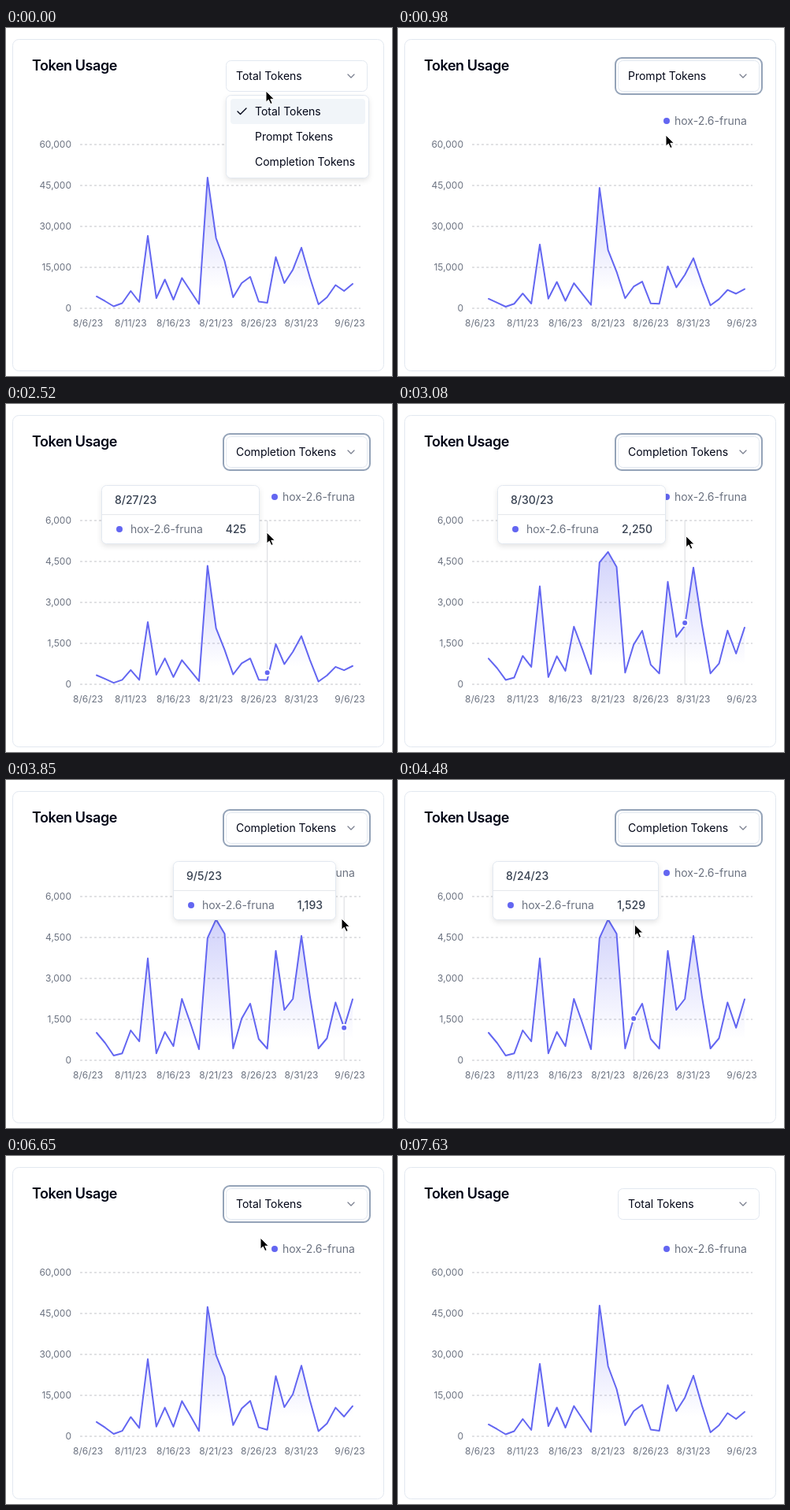
An HTML page that plays this animation: 490x442 px, repeating every 7700 ms.

```html
<!DOCTYPE html>
<html lang="en">
<head>
<meta charset="utf-8">
<title>Token Usage</title>
<style>
  html, body { margin: 0; width: 100%; height: 100%; overflow: hidden; background: #fff; }
  svg { display: block; font-family: Inter, sans-serif; font-size: 14px; fill: none; }
  text { fill: #020617; }
  .title { font-size: 18px; font-weight: 600; letter-spacing: -0.45px; }
  .axis text { font-size: 12px; fill: #6b7280; }
  .name { fill: #6b7280; }
  .strong { fill: #374151; font-weight: 500; }
  .box { fill: #fff; stroke: #e2e8f0; }
  .pop { filter: drop-shadow(0 3px 3px rgba(0, 0, 0, .1)); }
  .accent { fill: #6366f1; }
  .grid { stroke: #c3c4c9; stroke-dasharray: 3 3; }
</style>
</head>
<body>
<svg id="stage" width="490" height="442" viewBox="0 0 490 442">
  <defs>
    <linearGradient id="fade" x1="0" y1="0" x2="0" y2="1">
      <stop offset=".05" stop-color="#6366f1" stop-opacity=".28"/>
      <stop offset=".85" stop-color="#6366f1" stop-opacity="0"/>
    </linearGradient>
  </defs>
  <rect class="box" x="8.5" y="14.5" width="471" height="421" rx="8"/>
  <text class="title" x="33" y="54">Token Usage</text>

  <rect id="ring" x="276" y="38" width="186" height="46" rx="8" stroke="#94a3b8" stroke-width="2"/>
  <rect class="box" x="279.5" y="41.5" width="179" height="39" rx="6"/>
  <text id="choice" x="292" y="66"></text>
  <path d="M434 59l4 4 4-4" stroke="#7b8190" stroke-width="1.3" stroke-linecap="round" stroke-linejoin="round"/>

  <g id="axis" class="axis"></g>
  <circle class="accent" cx="341" cy="118" r="4"/>
  <text class="name" x="351" y="123">hox-2.6-fruna</text>
  <path id="area" fill="url(#fade)"/>
  <path id="guide" stroke="#d8dade"/>
  <path id="line" stroke="#6366f1" stroke-width="2" stroke-linejoin="round" stroke-linecap="round"/>
  <circle id="dot" class="accent" r="4" stroke="#fff" stroke-width="2"/>

  <g id="tip">
    <rect id="tipBox" class="box pop" x=".5" y=".5" height="74" rx="6"/>
    <path id="tipRule" stroke="#e5e7eb"/>
    <text id="tipDate" class="strong" x="17" y="24"></text>
    <circle class="accent" cx="23" cy="56" r="4"/>
    <text class="name" x="37" y="61">hox-2.6-fruna</text>
    <text id="tipValue" class="strong" y="61" text-anchor="end"></text>
  </g>

  <g id="menu">
    <rect class="box pop" x="279.5" y="85.5" width="181" height="105" rx="6"/>
    <rect id="hover" x="285" width="171" height="32" rx="4" fill="#f1f5f9"/>
    <path id="check" d="M294 0l3.5 3.5 7.5-7.5" stroke="#020617" stroke-width="1.4" stroke-linecap="round" stroke-linejoin="round"/>
    <g id="items"></g>
  </g>

  <path id="pointer" d="M0 0V14.2L3.3 11.2 5.8 16.6 8.2 15.5 5.8 10.3H10.4Z" fill="#000" stroke="#fff" stroke-linejoin="round"/>
</svg>
<script>
const LOOP = 7700, STEP = 70, MORPH = 900;
const TOP = 148, BASE = 356, X0 = 104.17, DX = 10.833;
const $ = id => document.getElementById(id);

const total = [4330, 2600, 720, 1870, 6350, 2310, 26540, 3750, 10530, 3170, 11100, 6350, 1590, 47890, 25680, 17310,
  4040, 9230, 11540, 2450, 2020, 18750, 9230, 14140, 22210, 11250, 1440, 4040, 8510, 6350, 8940];
const completion = [1010, 635, 173, 255, 1096, 692, 3736, 255, 1038, 519, 2250, 1356, 404, 4480, 5160, 4640,
  433, 1529, 2077, 779, 425, 4010, 1846, 2250, 4558, 2337, 433, 808, 2120, 1193, 2236];
const modes = [
  { label: 'Total Tokens', max: 60000, data: total },
  { label: 'Prompt Tokens', max: 60000, data: total.map((v, i) => v - completion[i]) },
  { label: 'Completion Tokens', max: 6000, data: completion }
];

// [time, mode] of each choice, and [open, close] of the menu
const picks = [[490, 1], [2520, 2], [6160, 0]];
const menus = [[0, 490], [1610, 2520], [5740, 6160]];
const BLUR = 7420;
// pointer tip: time, x, y
const path = [[0, 330, 80], [380, 340, 136], [1080, 340, 136], [1500, 334, 58], [1680, 334, 58],
  [2400, 331, 163], [2720, 331, 163], [3600, 426, 176], [4000, 426, 176], [4700, 262, 186],
  [4970, 262, 186], [5390, 288, 125], [5650, 325, 60], [5770, 325, 60], [6080, 323, 104],
  [6720, 323, 104], [7200, 350, -30]];

function svg(parent, tag, attrs, text = '') {
  const el = document.createElementNS('http://www.w3.org/2000/svg', tag);
  set(el, attrs);
  el.textContent = text;
  parent.append(el);
  return el;
}
function set(el, attrs) {
  for (const k in attrs) el.setAttribute(k, attrs[k]);
}
const show = (el, on) => el.setAttribute('visibility', on ? 'visible' : 'hidden');

const ticks = [0, 1, 2, 3, 4].map(i => {
  const y = BASE - i * 52;
  svg($('axis'), 'path', { class: 'grid', d: `M94 ${y}H450` });
  return svg($('axis'), 'text', { x: 83, y: y + 4, 'text-anchor': 'end' });
});
const day = i => i < 26 ? `8/${i + 6}/23` : `9/${i - 25}/23`;
for (const i of [0, 5, 10, 15, 20, 25, 31])
  svg($('axis'), 'text', { x: Math.min(X0 + i * DX, 436.5), y: 379, 'text-anchor': 'middle' }, day(i));
modes.forEach((m, i) => svg($('items'), 'text', { x: 316, y: 111 + 32 * i }, m.label));

// cubic-bezier(.25, .1, .25, 1)
function ease(x) {
  if (x <= 0) return 0;
  if (x >= 1) return 1;
  const bez = (s, a, b) => 3 * s * (1 - s) ** 2 * a + 3 * s * s * (1 - s) * b + s ** 3;
  let lo = 0, hi = 1;
  for (let i = 0; i < 24; i++) {
    const mid = (lo + hi) / 2;
    if (bez(mid, .25, .25) < x) lo = mid; else hi = mid;
  }
  return bez(lo, .1, 1);
}

function pointerAt(t) {
  const i = path.findIndex(p => p[0] > t);
  if (i < 0) return path[path.length - 1].slice(1);
  const [t0, x0, y0] = path[i - 1], [t1, x1, y1] = path[i];
  const u = (t - t0) / (t1 - t0), k = u * u * (3 - 2 * u);
  return [x0 + (x1 - x0) * k, y0 + (y1 - y0) * k];
}
const isOpen = t => menus.some(([a, b]) => t >= a && t < b);

// index of the day under the pointer, or -1
function dayAt(t) {
  if (t < 0 || isOpen(t)) return -1;
  const [x, y] = pointerAt(t);
  if (y < TOP || y > BASE || x < 94 || x > 450) return -1;
  return Math.max(1, Math.min(31, Math.round((x - X0) / DX)));
}

const heights = m => m.data.map(v => v / m.max * (BASE - TOP));

function drawChart(from, mode, k) {
  const a = heights(from), b = heights(mode);
  const pts = b.map((h, i) => `${(X0 + (i + 1) * DX).toFixed(2)} ${(BASE - a[i] - (h - a[i]) * k).toFixed(2)}`);
  const d = 'M' + pts.join('L');
  set($('line'), { d });
  set($('area'), { d: `${d}V${BASE}H${X0 + DX}Z` });
  ticks.forEach((el, i) => el.textContent = (mode.max / 4 * i).toLocaleString('en-US'));
}

function drawTip(t, mode) {
  const i = dayAt(t), on = i > 0;
  for (const id of ['tip', 'guide', 'dot']) show($(id), on);
  if (!on) return;
  const x = X0 + i * DX, value = mode.data[i - 1];
  set($('guide'), { d: `M${x} ${TOP}V${BASE}` });
  set($('dot'), { cx: x, cy: BASE - value / mode.max * (BASE - TOP) });
  $('tipDate').textContent = day(i);
  $('tipValue').textContent = value.toLocaleString('en-US');
  const w = Math.round(175 + $('tipValue').getComputedTextLength());
  set($('tipBox'), { width: w - 1 });
  set($('tipRule'), { d: `M1 37.5H${w - 1}` });
  set($('tipValue'), { x: w - 17 });
  // the box trails the pointer a little
  let sum = 0, n = 0;
  for (let s = 0; s <= 240; s += 20) {
    const j = dayAt(t - s);
    if (j > 0) { sum += X0 + j * DX; n++; }
  }
  set($('tip'), { transform: `translate(${Math.round(sum / n - 10 - w)} 103)` });
}

function drawMenu(t, current, y) {
  const open = isOpen(t);
  show($('menu'), open);
  show($('ring'), !open && t < BLUR);
  $('choice').textContent = modes[current].label;
  if (!open) return;
  const row = y < 90 ? current : Math.min(2, Math.floor((y - 90) / 32));
  set($('hover'), { y: 90 + 32 * row });
  set($('check'), { transform: `translate(0 ${106 + 32 * current})` });
}

function render(t) {
  let from = 0, current = 0, start = -MORPH;
  for (const [at, mode] of picks)
    if (t >= at) { from = current; current = mode; start = at; }
  const [x, y] = pointerAt(t);
  drawChart(modes[from], modes[current], ease((t - start) / MORPH));
  drawTip(t, modes[current]);
  drawMenu(t, current, y);
  set($('pointer'), { transform: `translate(${x.toFixed(1)} ${y.toFixed(1)})` });
}

const began = performance.now();
function tick() {
  const t = (performance.now() - began) % LOOP;
  render(Math.floor(t / STEP) * STEP);
  requestAnimationFrame(tick);
}
tick();
</script>
</body>
</html>
```
